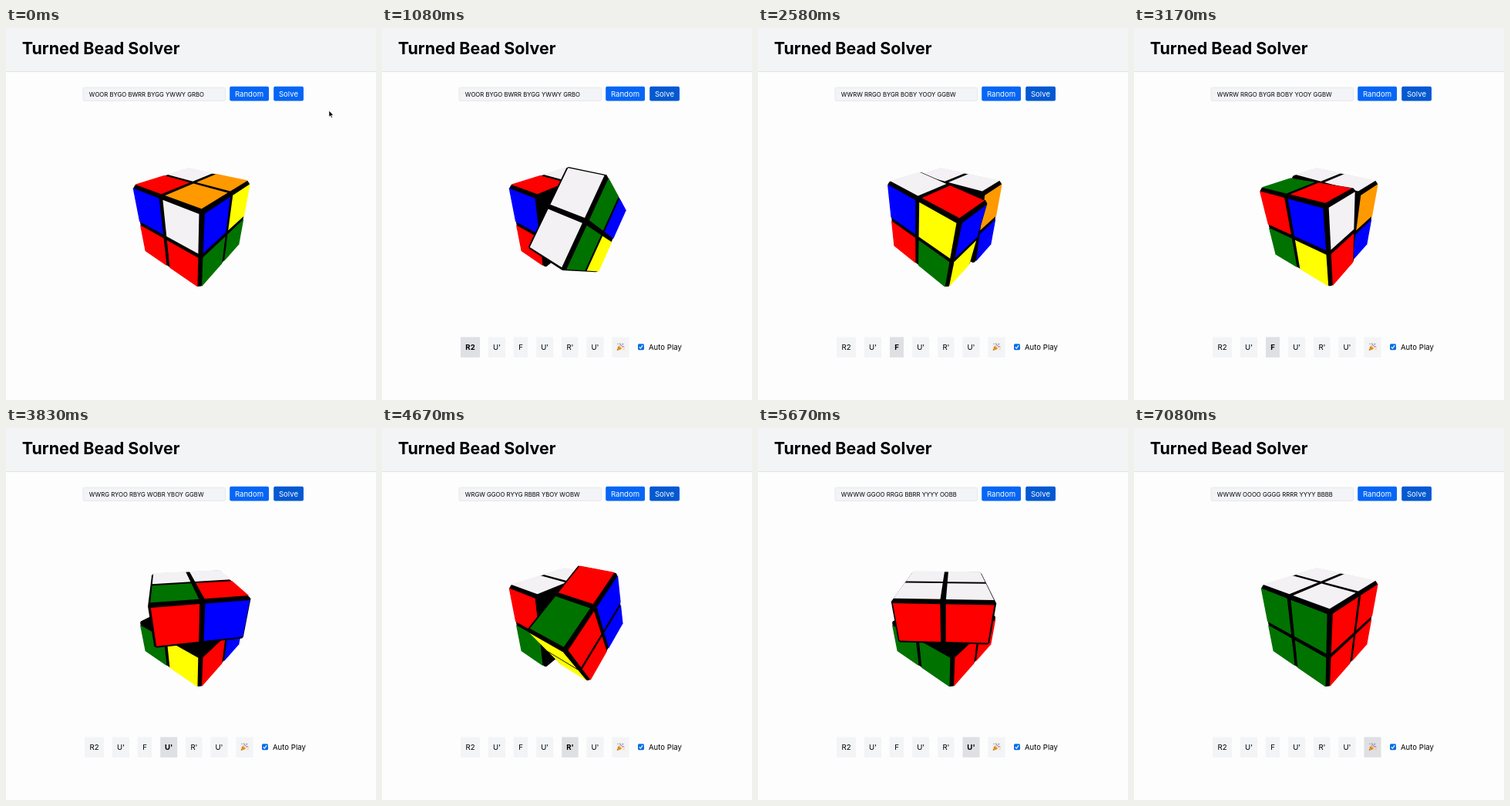
These frames come from a looping animation (480x482 px, 7.16 s). An HTML page:

```html
<!DOCTYPE html>
<html lang="en">
<head>
<meta charset="utf-8">
<title>Turned Bead Solver</title>
<style>
  html, body { margin: 0; width: 100%; height: 100%; overflow: hidden; background: #fdfdfe; }
  svg { display: block; width: 480px; height: 482px; }
  text { font-family: Inter, "Liberation Sans", sans-serif; font-size: 9.6px; fill: #000; }
  .title { font-size: 21.4px; font-weight: 700; }
  .state { font-size: 7.75px; }
  .mid { text-anchor: middle; }
  .light { fill: #fff; }
</style>
</head>
<body>
<svg id="stage" viewBox="0 0 480 482" xmlns="http://www.w3.org/2000/svg">
  <rect width="480" height="482" fill="#fdfdfe"/>
  <rect width="480" height="56" fill="#f3f4f6"/>
  <rect y="56" width="480" height="1" fill="#e1e3e6"/>
  <text class="title" x="20.8" y="34.3">Turned Bead Solver</text>

  <rect x="100" y="77.2" width="184.6" height="17.2" rx="2" fill="#f3f4f6" stroke="#e2e4e8" stroke-width=".8"/>
  <text id="state" class="state" x="107.8" y="88.5"></text>
  <rect x="290.2" y="75.8" width="50.8" height="18.6" rx="2" fill="#0566f4"/>
  <text class="mid light" x="315.5" y="88.7">Random</text>
  <rect id="solve" x="347.2" y="75.8" width="38.8" height="18.6" rx="2"/>
  <text class="mid light" x="366.5" y="88.7">Solve</text>

  <g id="cube"></g>

  <g id="bar">
    <g id="steps"></g>
    <g id="party">
      <path d="M304.4 418.3L306.8 411.4Q310 412.6 311.2 415.8Z" fill="#efa02a"/>
      <path d="M306.2 413.4L308.8 416.6M305.2 416L306.6 417.4" stroke="#a9561a" stroke-width=".9"/>
      <path d="M309 411.5Q309.6 409.8 308.5 408.4M311 413.3Q313 412 314.4 413.2" fill="none" stroke="#d8434e" stroke-width="1"/>
      <path d="M310.2 412.3Q311 409.8 313.6 409.2" fill="none" stroke="#4a90d9" stroke-width="1"/>
      <circle cx="306" cy="409.3" r=".7" fill="#4a90d9"/>
      <circle cx="311.2" cy="408.6" r=".6" fill="#e8b521"/>
      <circle cx="313.8" cy="416.3" r=".7" fill="#e8b521"/>
    </g>
    <rect x="332" y="409.2" width="8" height="8" rx="1.5" fill="#0a6ee8"/>
    <path d="M333.8 413.3L335.4 415.1L338.3 411.2" fill="none" stroke="#fff" stroke-width="1.2"/>
    <text x="346" y="417">Auto Play</text>
  </g>
  <path id="cursor" d="M0 0V8.2L1.9 6.5L3.2 9.3L4.5 8.7L3.3 6H5.7Z" fill="#000" stroke="#fff" stroke-width=".6"/>
</svg>
<script>
const LOOP = 7160, FIRST = 482, PERIOD = 953, TURN = 940;
const $ = id => document.getElementById(id);

// axis 0/1/2 = x/y/z, quarter turns counted counterclockwise from outside
const MOVES = [
  { label: "R2", axis: 0, q: -2, x: 102, w: 25 },
  { label: "U'", axis: 1, q: 1, x: 138, w: 22 },
  { label: "F", axis: 2, q: -1, x: 171, w: 18 },
  { label: "U'", axis: 1, q: 1, x: 200.2, w: 22 },
  { label: "R'", axis: 0, q: 1, x: 233.2, w: 21.5 },
  { label: "U'", axis: 1, q: 1, x: 265.5, w: 22 }
];
const FACES = [
  { c: "W", n: [0, 1, 0], r: [1, 0, 0], u: [0, 0, -1] },
  { c: "O", n: [-1, 0, 0], r: [0, 0, 1], u: [0, 1, 0] },
  { c: "G", n: [0, 0, 1], r: [1, 0, 0], u: [0, 1, 0] },
  { c: "R", n: [1, 0, 0], r: [0, 0, -1], u: [0, 1, 0] },
  { c: "Y", n: [0, -1, 0], r: [1, 0, 0], u: [0, 0, 1] },
  { c: "B", n: [0, 0, -1], r: [-1, 0, 0], u: [0, 1, 0] }
];
const CORNERS = [[-1, 1], [1, 1], [1, -1], [-1, -1]];
const COLORS = { W: "#f3f1f3", O: "#ff9900", G: "#007200", R: "#ff0000", Y: "#ffff00", B: "#0000ff" };

// Bevelled body: face plane, sticker plane, and the sticker's inner and outer edge
const BODY = 1.025, PLANE = 1.04, INNER = 0.055, OUTER = 0.97;

const combine = (f, a, b, c) => f.n.map((v, i) => v * a + f.r[i] * b + f.u[i] * c);
const dot = (a, b) => a[0] * b[0] + a[1] * b[1] + a[2] * b[2];

function rotate(p, axis, angle) {
  const j = (axis + 1) % 3, k = (axis + 2) % 3, out = p.slice();
  const c = Math.cos(angle), s = Math.sin(angle);
  out[j] = p[j] * c - p[k] * s;
  out[k] = p[j] * s + p[k] * c;
  return out;
}

function turn(stickers, axis, q) {
  const spin = p => rotate(p, axis, q * Math.PI / 2).map(Math.round);
  return stickers.map(s => s.p[axis] > 0 ? { c: s.c, p: spin(s.p), n: spin(s.n) } : s);
}

function describe(stickers) {
  return FACES.map(f => CORNERS.map(([a, b]) => {
    const p = combine(f, 1, a, b);
    return stickers.find(s => dot(s.n, f.n) === 1 && dot(s.p, p) === 3).c;
  }).join("")).join(" ");
}

// Work backwards from the solved cube
const states = [];
states[MOVES.length] = FACES.flatMap(f =>
  CORNERS.map(([a, b]) => ({ c: f.c, p: combine(f, 1, a, b), n: f.n })));
for (let i = MOVES.length - 1; i >= 0; i--)
  states[i] = turn(states[i + 1], MOVES[i].axis, -MOVES[i].q);
const names = states.map(describe);

// Camera
const AZ = 38.9 * Math.PI / 180, EL = Math.asin(0.52), DIST = 4.6, FOCAL = 217.9, CX = 242.8, CY = 247.8;
const sa = Math.sin(AZ), ca = Math.cos(AZ), se = Math.sin(EL), ce = Math.cos(EL);
const EYE = [sa * ce * DIST, se * DIST, ca * ce * DIST];

function project([x, y, z]) {
  const near = x * sa + z * ca;
  const k = FOCAL / (DIST - y * se - near * ce);
  return [CX + k * (x * ca - z * sa), CY - k * (y * ce - near * se)];
}

function polygon(points, color) {
  const list = points.map(p => p.map(v => v.toFixed(2)).join()).join(" ");
  return `<polygon points="${list}" fill="${color}"/>`;
}

// Outline around a set of flat points
function hull(points) {
  points.sort((a, b) => a[0] - b[0] || a[1] - b[1]);
  const cross = (o, a, b) => (a[0] - o[0]) * (b[1] - o[1]) - (a[1] - o[1]) * (b[0] - o[0]);
  const chain = list => {
    const out = [];
    for (const p of list) {
      while (out.length > 1 && cross(out.at(-2), out.at(-1), p) <= 0) out.pop();
      out.push(p);
    }
    return out.slice(0, -1);
  };
  return [...chain(points), ...chain(points.slice().reverse())];
}

// Half of the cube on one side of the cut
function slab(stickers, axis, side, angle) {
  const spin = p => rotate(p, axis, angle);
  const body = FACES.flatMap(f => CORNERS.map(([a, b]) => {
    const p = combine(f, BODY, a * OUTER, b * OUTER);
    if (p[axis] * side < 0) p[axis] = 0;
    return project(spin(p));
  }));
  let out = polygon(hull(body), "#000");
  for (const s of stickers) {
    if (s.p[axis] !== side) continue;
    const f = FACES.find(g => dot(g.n, s.n) === 1);
    const a = dot(s.p, f.r), b = dot(s.p, f.u);
    const pts = [[INNER, INNER], [OUTER, INNER], [OUTER, OUTER], [INNER, OUTER]]
      .map(([x, y]) => spin(combine(f, PLANE, a * x, b * y)));
    if (dot(spin(s.n), EYE) > PLANE) out += polygon(pts.map(project), COLORS[s.c]);
  }
  return out;
}

const ease = x => x < 0.5 ? 2 * x * x : 1 - 2 * (1 - x) * (1 - x);

// Step buttons
const boxes = [...MOVES, { label: "", x: 298.5, w: 22 }];
$("steps").innerHTML = boxes.map(b =>
  `<rect x="${b.x}" y="400.5" width="${b.w}" height="26.3"/>` +
  `<text class="mid" x="${b.x + b.w / 2}" y="417">${b.label}</text>`).join("");
const rects = [...$("steps").querySelectorAll("rect")];
const labels = [...$("steps").querySelectorAll("text")];

// Pointer path: time, x, y
const PATH = [[0, 419, 107], [80, 417, 106], [330, 369, 87], [520, 369, 87], [750, 399, 84]];
function pointer(t) {
  const i = Math.max(1, PATH.findIndex(p => p[0] > t));
  const a = PATH[i - 1], b = PATH[i];
  const m = ease((t - a[0]) / (b[0] - a[0]));
  return [a[1] + (b[1] - a[1]) * m, a[2] + (b[2] - a[2]) * m];
}

let shown = null;
function draw(t) {
  const started = t >= FIRST;
  const step = started ? Math.min(MOVES.length, Math.floor((t - FIRST) / PERIOD)) : 0;
  const move = MOVES[step] || MOVES[MOVES.length - 1];
  const phase = started && step < MOVES.length ? Math.min(1, (t - FIRST - step * PERIOD) / TURN) : 0;
  const angle = ease(phase) * move.q * Math.PI / 2;

  $("cube").innerHTML = slab(states[step], move.axis, -1, 0) + slab(states[step], move.axis, 1, angle);
  $("solve").setAttribute("fill", t > 270 ? "#0459d1" : "#0566f4");

  const key = started ? step : -1;
  if (key !== shown) {
    shown = key;
    $("state").textContent = names[step];
    $("bar").style.display = started ? "" : "none";
    rects.forEach((r, i) => r.setAttribute("fill", i === step ? "#dfe0e4" : "#f3f4f6"));
    labels.forEach((l, i) => l.setAttribute("font-weight", i === step ? 700 : 400));
  }

  const visible = t < 750;
  $("cursor").style.display = visible ? "" : "none";
  if (visible) $("cursor").setAttribute("transform", `translate(${pointer(t)})`);
}

const begin = performance.now();
function tick() {
  draw((performance.now() - begin) % LOOP);
  requestAnimationFrame(tick);
}
draw(0);
requestAnimationFrame(tick);
</script>
</body>
</html>
```
